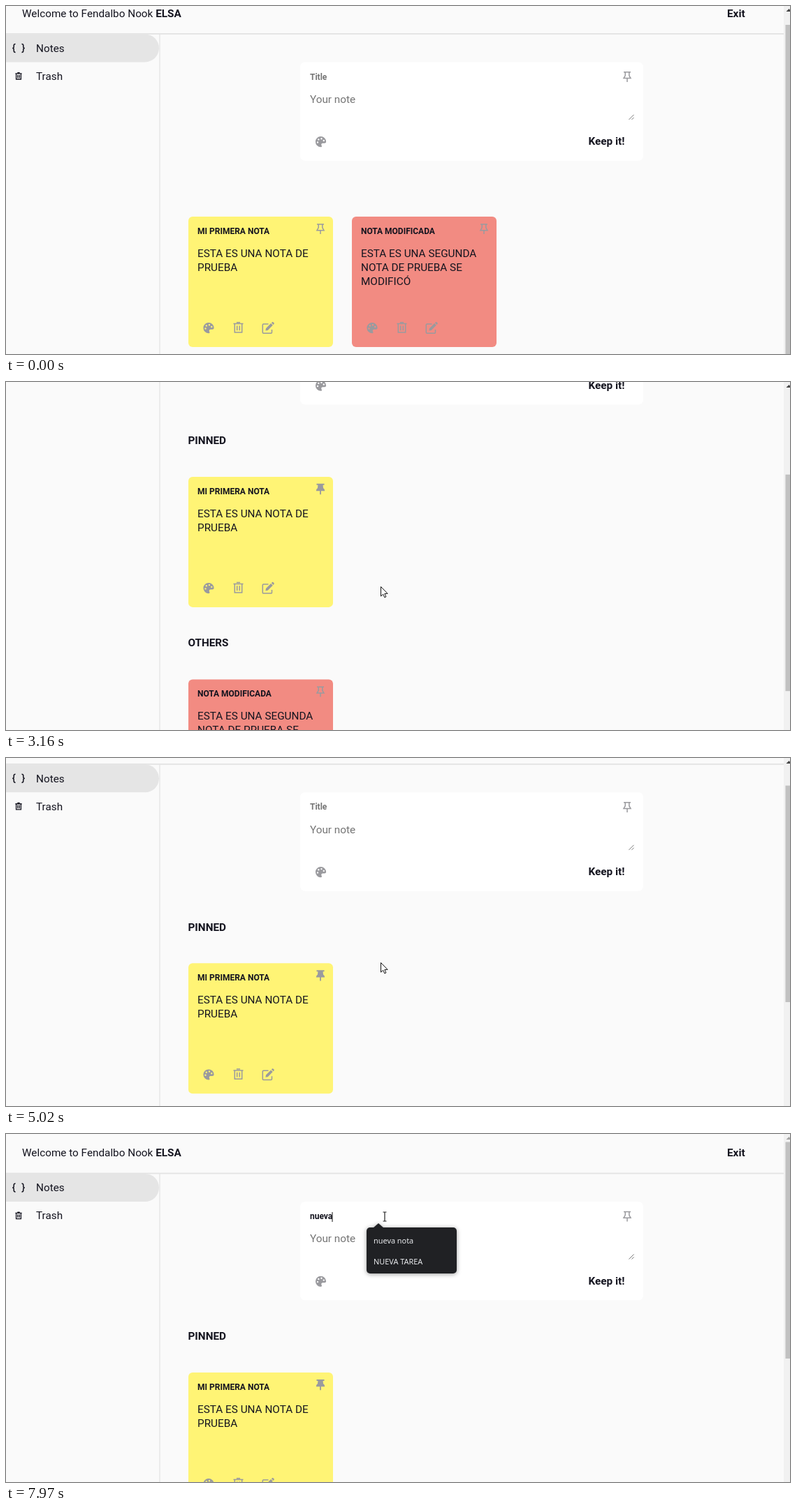
Animation of 1122 by 499 pixels, one loop 8 s. Source, as an HTML page:

```html
<!DOCTYPE html>
<html lang="es">
<head>
<meta charset="utf-8">
<style>
html, body { margin: 0; width: 100%; height: 100%; overflow: hidden; background: #fafafa; }
svg { display: block; font: 15.3px Roboto, sans-serif; fill: #14141f; }
.b { font-weight: 700; }
.s { font-size: 12px; font-weight: 700; }
.hint { fill: #757575; }
.line { fill: none; stroke-width: 1.5; }
.tip { font: 500 10.9px "Noto Sans", sans-serif; fill: #e8eaed; }
</style>
</head>
<body>
<svg id="stage" width="1122" height="499" viewBox="0 0 1122 499"></svg>
<script>
const LOOP = 8000, TICK = 10, GRAY = '#9a9a9e', INK = '#14141f';
const stage = document.getElementById('stage');
const $ = id => document.getElementById(id);

const at = (x, y, body, id = '') => `<g ${id && `id="${id}"`} transform="translate(${x} ${y})">${body}</g>`;
const text = (x, y, s, cls = '') => `<text x="${x}" y="${y}" class="${cls}">${s}</text>`;
const rect = (x, y, w, h, fill, r = 0, id = '') =>
  `<rect ${id && `id="${id}"`} x="${x}" y="${y}" width="${w}" height="${h}" rx="${r}" fill="${fill}"/>`;
const stroke = (d, color = GRAY, width = 1.5) =>
  `<path class="line" stroke="${color}" style="stroke-width:${width}" d="${d}"/>`;
const fill = (d, color = GRAY) => `<path fill="${color}" fill-rule="evenodd" d="${d}"/>`;
const outlined = d => `<path fill="#fff" stroke="#111" stroke-linejoin="round" d="${d}"/>`;

// Icons, centred on 0,0
const holes = [0, 1, 2, 3].map(i => {
  const a = (170 + i * 56) * Math.PI / 180;
  return `M${4.6 * Math.cos(a) - 1.2} ${4.6 * Math.sin(a)}a1.2 1.2 0 1 0 2.4 0a1.2 1.2 0 1 0-2.4 0`;
}).join('');
const palette = fill('M7.6 0A7.6 7.6 0 1 0 0 7.6C2 7.6 1.6 6 1 5C.2 3.5 1.2 2 2.8 2H5.2C6.6 2 7.6 1.2 7.6 0Z' + holes);
const pin = stroke('M-5-6.6H5M-2.8-6.6V-1.6L-5 2.2H5L2.8-1.6V-6.6M0 2.2V7.6');
const pinSolid = fill('M-5.5-7.6H5.5V-5.6H3.6L4-1.4Q6.2 0 6.2 2.8H.9V7.8H-.9V2.8H-6.2Q-6.2 0-4-1.4L-3.6-5.6H-5.5Z');
const trash = (color, width) =>
  stroke('M-7-5.4H7M-2.6-7.3H2.6M-5.2-5.4V7H5.2V-5.4M-1.8-2.6V4.3M1.8-2.6V4.3', color, width);
const edit = stroke('M.5-5.5H-6.5Q-7.7-5.5-7.7-4.3V6.5Q-7.7 7.7-6.5 7.7H4.3Q5.5 7.7 5.5 6.5V2.5') +
  fill('M-3.6 4L-3 .7L4.1-6.4L6.8-3.7L-.3 3.4ZM4.9-7.2L6-8.3Q6.8-8.8 7.6-8.1L8.5-7.2Q9-6.4 8.6-5.6L7.6-4.5Z');
const brace = stroke('M-4.5-6Q-6.8-6-6.8-3.8V-2Q-6.8 0-8.8 0Q-6.8 0-6.8 2V3.8Q-6.8 6-4.5 6', INK);
const braces = brace + `<g transform="scale(-1 1)">${brace}</g>`;

// Pointers, tip or centre on 0,0
const arrow = outlined('M0 0V13.6L3.2 10.7L5.3 15.4L7.4 14.5L5.4 9.9H9.6Z');
const hand = outlined('M-1.6 1Q0-1 1.6 1V7Q3.4 5.7 4.7 7.4Q6.4 6.4 7.6 8Q9.8 7.4 10 9.6V14Q9.8 17 8 19H0L-5.4 12.4Q-6.4 10-4.2 10L-1.6 12Z');
const beam = stroke('M-2.5-6.5H2.5M0-6.5V6.5M-2.5 6.5H2.5', '#222', 1.2);

const card = (id, color, title, lines) => at(0, 0,
  rect(0, 0, 207, 187, color, 6) + text(13, 24.8, title, 's') +
  lines.map((s, i) => text(13, 58 + 20 * i, s)).join('') +
  at(189, 17.5, pin, id + 'Pin') + at(29, 159.7, palette) + at(71.5, 159, trash(GRAY)) + at(114, 159.5, edit), id);

const menu = (id, w, items) => `<g id="${id}">` +
  `<g style="filter:drop-shadow(0 1px 3px #0006)">${rect(516, 134, w, 6 + 30 * items.length, '#202124', 5)}` +
  fill('M525 135L533 128L541 135Z', '#202124') + '</g>' +
  items.map((s, i) => text(526, 157 + 30 * i, s, 'tip')).join('') + '</g>';

const page =
  rect(219, 57, 2, 900, '#ececec') + rect(0, 55.6, 1114, 1.8, '#e3e3e3') +
  text(23, 32.4, 'Welcome to Fendalbo Nook <tspan class="b">ELSA</tspan>') + text(1032, 32.4, 'Exit', 'b') +
  fill('M0 57H199A20 20 0 0 1 199 97H0Z', '#e5e5e5') +
  at(18, 77, braces) + text(43, 82.4, 'Notes') +
  at(18, 117, `<g transform="scale(.66)">${trash(INK, 2)}</g>`) + text(43, 122.4, 'Trash') +
  rect(421, 97, 491, 141.5, '#fff', 7) +
  '<text id="title" x="435" y="122.2"></text>' + rect(435, 112, 1, 14, '#111', 0, 'caret') +
  at(889, 118, pin) + text(435, 155.4, 'Your note', 'hint') +
  stroke('M891.5 179.5L898.5 172.5M895.5 179.5L898.5 176.5', '#777', 1) +
  at(450.5, 211.3, palette) + text(833.5, 216, 'Keep it!', 'b') +
  `<g id="heads">${text(260.5, 295.4, 'PINNED', 'b') + text(260.5, 585.4, 'OTHERS', 'b')}</g>` +
  card('yellow', '#fff475', 'MI PRIMERA NOTA', ['ESTA ES UNA NOTA DE', 'PRUEBA']) +
  card('red', '#f28b82', 'NOTA MODIFICADA', ['ESTA ES UNA SEGUNDA', 'NOTA DE PRUEBA SE', 'MODIFICÓ']) +
  menu('allTips', 141, ['nueva nota', 'NUEVA TAREA', 'primera nota', 'tarea', 'prueba', 'lista']) +
  menu('fewTips', 129, ['nueva nota', 'NUEVA TAREA']);

stage.innerHTML = at(0, 0, page, 'page') +
  rect(1113, 0, 9, 499, '#f1f1f1') + rect(1115.5, 0, 7, 310.5, '#c1c1c1', 0, 'thumb') +
  '<path id="up" d="M1116.5 8L1120.5 4L1124.5 8Z"/>' +
  at(0, 0, at(0, 0, arrow, 'arrow') + at(0, 0, hand, 'hand') + at(0, 0, beam, 'beam'), 'cursor');

// Glides: start, end, then the place reached
const scrolls = [[2995, 3285, 331], [4383, 4691, 84], [4920, 5140, 0]];
const moves = [[130, 920, 438, 301], [950, 1380, 450, 314], [1810, 2110, 453, 315.5],
  [2700, 3000, 536.5, 293.5], [5290, 5540, 554, 123], [5560, 5940, 542, 118.5]];
const keyTimes = [7210, 7330, 7450, 7840, 7970];

function glide(place, legs, t) {
  for (const [start, end, ...goal] of legs) {
    const p = Math.min(1, Math.max(0, (t - start) / (end - start)));
    const eased = p * p * (3 - 2 * p);
    place = place.map((v, i) => v + (goal[i] - v) * eased);
  }
  return place;
}
const move = (id, x, y) => $(id).setAttribute('transform', `translate(${x} ${y})`);
const show = (id, on) => $(id).setAttribute('visibility', on ? 'visible' : 'hidden');

let wasPinned = null;
function layout(pinned) {
  if (pinned === wasPinned) return;
  wasPinned = pinned;
  $('yellowPin').innerHTML = pinned ? pinSolid : pin;
  move('yellow', 261, pinned ? 342 : 318.6);
  move('red', pinned ? 261 : 495, pinned ? 632.5 : 318.6);
  show('heads', pinned);
}

function draw() {
  const t = Math.floor(performance.now() % LOOP / TICK) * TICK;
  const pinned = t >= 1810;
  const [scroll] = glide([16.6], scrolls, t);
  layout(pinned);
  move('page', 0, -scroll);
  $('thumb').setAttribute('y', pinned ? 11.5 + .588 * scroll : 27);
  $('thumb').setAttribute('height', pinned ? 310.5 : 480);
  $('up').setAttribute('fill', scroll > 0 ? '#444' : '#a3a3a3');

  const word = 'nueva'.slice(0, keyTimes.filter(k => k <= t).length);
  const title = $('title');
  title.textContent = word || 'Title';
  title.setAttribute('class', word ? 's' : 's hint');
  $('caret').setAttribute('x', word ? Math.round(435 + title.getComputedTextLength()) - .5 : 435);
  show('caret', t >= 5870 && (t < 6370 || t >= 6860));
  show('allTips', t >= 5900 && t < 7240);
  show('fewTips', t >= 7240);

  const [x, y] = glide([1082, 488], moves, t);
  const overPin = t >= 820 && t < 1900, overText = t >= 5460;
  move('cursor', x, y);
  show('hand', overPin);
  show('beam', overText);
  show('arrow', t >= 130 && !overPin && !overText);
  requestAnimationFrame(draw);
}
draw();
</script>
</body>
</html>
```
